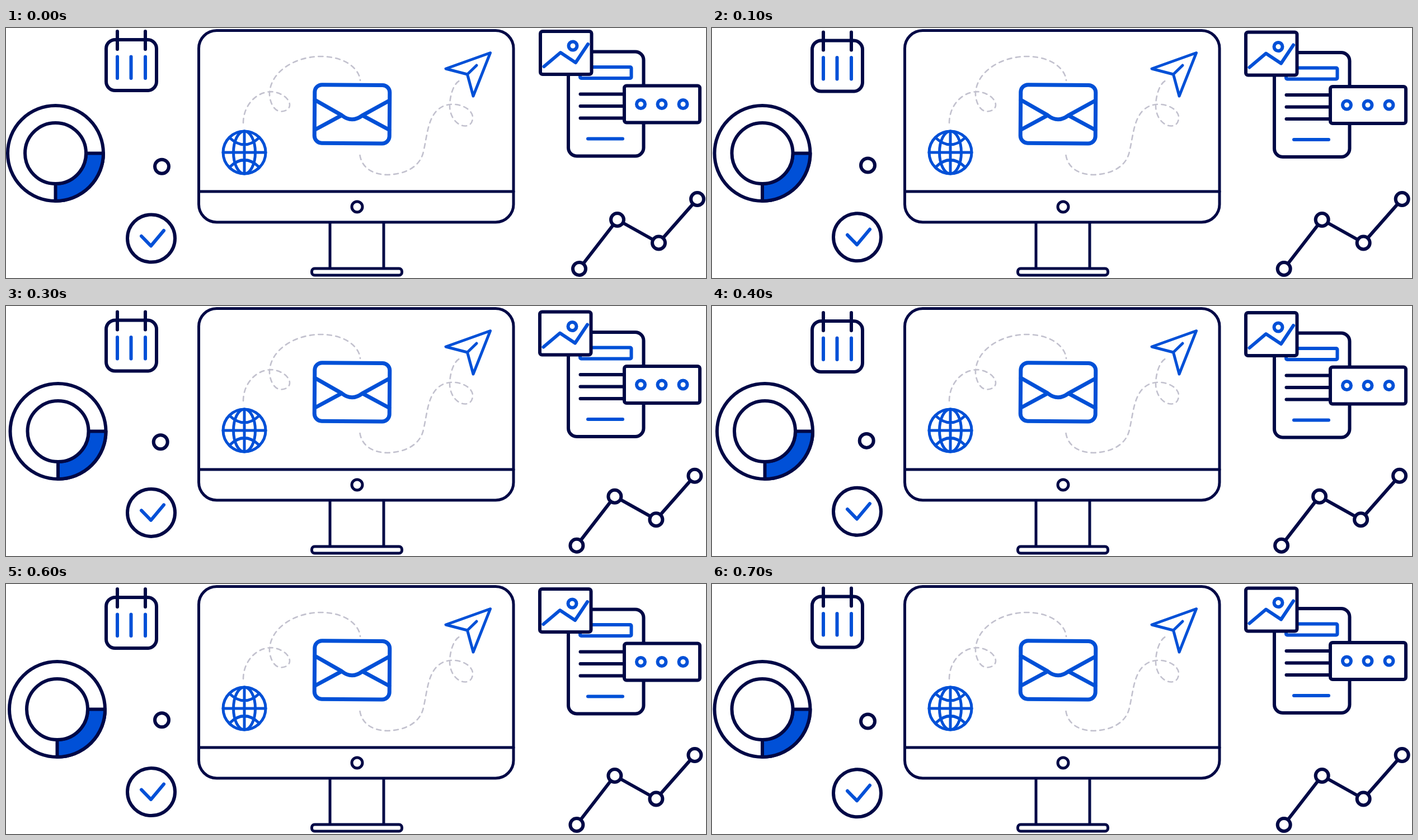
Recreate the animation shown at these times as an HTML page. Size 1251x448 px, loop 0.8 s.

```html
<!DOCTYPE html>
<html lang="en">
<head>
<meta charset="utf-8">
<style>
  html, body { margin: 0; width: 100%; height: 100%; overflow: hidden; background: #fff; }
  svg { display: block; width: 1251px; height: 448px; fill: #fff; stroke: #000846; stroke-width: 6; stroke-linecap: round; stroke-linejoin: round; }
  .blue { stroke: #0050d7; }
  .line { fill: none; }
  .thin { stroke-width: 5; }
  .trail { fill: none; stroke: #c2c1ce; stroke-width: 2.6; stroke-dasharray: 8 7.5; }
</style>
</head>
<body>
<svg viewBox="0 0 1251 448">
  <g class="thin">
    <path d="M579 348V431M675 348V431"/>
    <rect x="546.5" y="431" width="161" height="12" rx="5"/>
    <rect x="344.5" y="4.5" width="562.5" height="343.5" rx="32"/>
    <path d="M345 293H907"/>
    <circle cx="627.5" cy="320.5" r="9.5"/>
  </g>

  <path class="trail" d="M424 170C424 140 446 114 475 114C497 117 507 129 507 138C507 145 500 149.500 491 149.500C477 149 470 128 471 115C475 75 520 51 562 51C610 51 632 76 633 94"/>
  <path class="trail" d="M632.500 228C636 250 655 263 682 263C715 262 740 248 746 222C753 190 754 165 770 148C780 138 792 136 803 137C822 139 834 150 834 160C834 170 829 175.500 820 175.500C805 175 793 158 793 140C793 122 800 95 815 93"/>

  <g class="blue line" stroke-width="7" transform="rotate(.4 618 154)">
    <rect x="551.5" y="102" width="134" height="104.500" rx="13"/>
    <path d="M552 129.500L600 156.500Q618 171 637 156.500L685 129.500M552 183L600 156.500M637 156.500L685 182"/>
  </g>
  <g class="blue line thin">
    <circle cx="426" cy="223" r="38"/>
    <ellipse cx="426" cy="223" rx="19.500" ry="38"/>
    <path d="M388 223H464M426 185V261M400 197Q426 221 452 197M400 249Q426 224 452 249"/>
    <path d="M865.500 44.500L786 73L824.500 83L835 122ZM824.500 83L841 67"/>
  </g>

  <g id="calendar">
    <rect x="179" y="21" width="90" height="91" rx="16"/>
    <path d="M199 6V38M249 6V38"/>
    <path class="blue" d="M199 51.500V90M223.500 51.500V90M249 51.500V90"/>
  </g>

  <g id="donut">
    <circle cx="88.5" cy="224.500" r="85.500"/>
    <path fill="#0050d7" d="M143 224.500H174A85.500 85.500 0 0 1 88.500 310V279A54.500 54.500 0 0 0 143 224.500"/>
    <circle cx="88.5" cy="224.500" r="54.500"/>
  </g>

  <circle id="dot" cx="278.5" cy="248.300" r="12.500"/>

  <g id="check">
    <circle cx="259.5" cy="377" r="42.500"/>
    <path class="blue line" d="M242 373L259 390.500L282 363"/>
  </g>

  <g id="page">
    <rect x="1005" y="42.500" width="134.500" height="187" rx="15"/>
    <rect class="blue" x="1026" y="70" width="91.500" height="20" rx="2"/>
    <path d="M1026.500 118.500H1105M1026.500 140H1105M1026.500 161.500H1105"/>
    <path class="blue" d="M1040 198.500H1102"/>
    <rect x="1105" y="103.500" width="135" height="66" rx="4"/>
    <g class="blue">
      <circle cx="1134.5" cy="136.500" r="7.500"/>
      <circle cx="1172" cy="136.500" r="7.500"/>
      <circle cx="1210" cy="136.500" r="7.500"/>
    </g>
  </g>

  <g id="picture">
    <rect x="955" y="6" width="91.500" height="77" rx="4"/>
    <path class="blue line" d="M961.500 69L991 44L1018 62L1040 29"/>
    <circle class="blue" cx="1013" cy="32" r="7.500"/>
  </g>

  <g id="chart">
    <path class="line" d="M1024.500 431.500L1092.500 343.500L1166.500 385L1235.500 306.500"/>
    <circle cx="1024.5" cy="431.500" r="11.500"/>
    <circle cx="1092.5" cy="343.500" r="11.500"/>
    <circle cx="1166.5" cy="385" r="11.500"/>
    <circle cx="1235.5" cy="306.500" r="11.500"/>
  </g>
</svg>
<script>
  const STEP = 100, STEPS = 8, JUMP = 2.3;
  const move = (id, x, y) =>
    document.getElementById(id).setAttribute('transform', `translate(${x} ${y})`);

  function draw(now) {
    const step = Math.floor(now / STEP) % STEPS;
    const k = Math.min(step, STEPS - step); // 0 1 2 3 4 3 2 1
    const drift = 1.5 * k;
    const late = k > 2 ? -JUMP : 0;
    const early = -JUMP * (k > 2 ? k - 1 : k);
    move('calendar', 0, drift);
    move('donut', drift, 0);
    move('page', 0, drift);
    move('picture', k ? -1 : 0, drift);
    move('check', 0, -2.2 * k);
    move('dot', late, early);
    move('chart', early, late);
  }

  const start = performance.now();
  function tick() {
    draw(performance.now() - start);
    requestAnimationFrame(tick);
  }
  tick();
</script>
</body>
</html>
```
